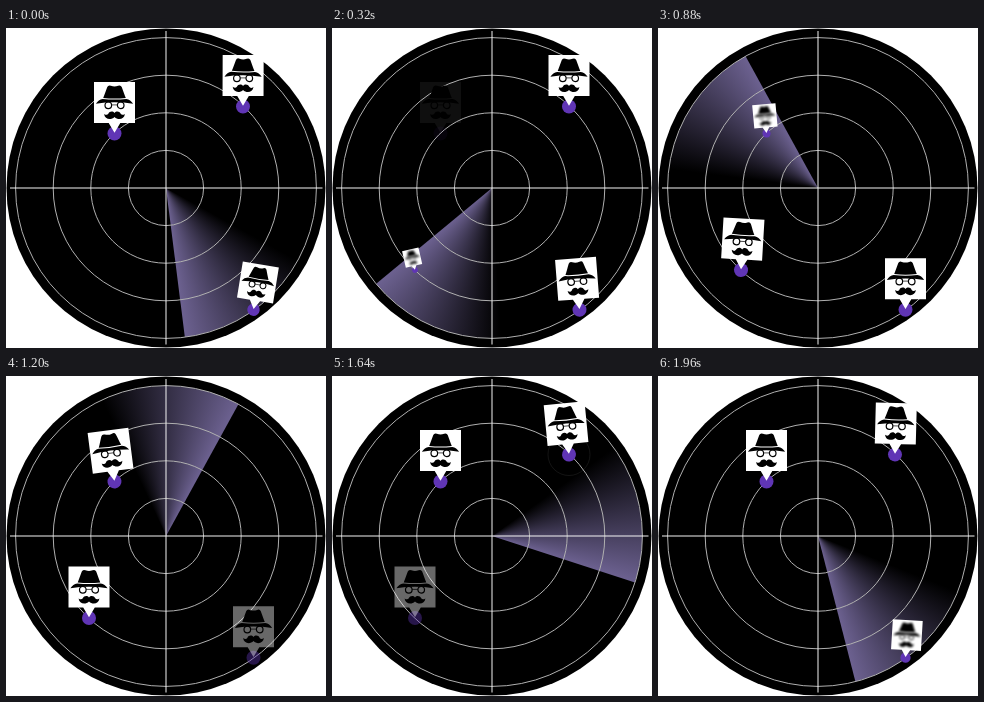
These frames come from a looping animation (320 by 320 pixels, 2 s). An HTML page with a canvas:

```html
<!DOCTYPE html>
<html lang="en">
<head>
<meta charset="utf-8">
<title>Radar</title>
<style>
  html, body { margin: 0; width: 100%; height: 100%; overflow: hidden; background: #fff; }
  canvas { display: block; }
</style>
</head>
<body>
<canvas id="stage" width="320" height="320"></canvas>
<script>
const ctx = document.getElementById('stage').getContext('2d');
const LOOP = 2000, STEP = 40, C = 160, TAU = Math.PI * 2;
const rad = deg => deg * Math.PI / 180;

// x, y of the dot and the moment the sweep reaches it
const pins = [
  [83, 242, 280],
  [108.5, 105.5, 800],
  [237, 78.5, 1280],
  [247.5, 281.7, 1840]
];

// Decaying swing: time in ms, tilt in degrees
const swing = [[0, -16], [180, 10], [410, -7.4], [610, 3.4], [740, 0]];

const crown = new Path2D('M-11.3-35.6C-9.8-39-8.6-43-7.2-46.6Q-6.2-48.8-3.6-47.8Q0-46.4 3.6-47.8Q6.2-48.8 7.2-46.6C8.6-43 9.8-39 11.3-35.6Q0-34.4-11.3-35.6Z');
const brim = new Path2D('M-18.6-29.8Q-16-33.8-11.8-34.6Q0-33.4 11.8-34.6Q16-33.8 18.6-29.8Q9-31.2 0-31.2T-18.6-29.8Z');
const moustache = new Path2D('M0-20.6C1.8-23 5-22.4 6.2-19.8Q7.6-17.6 10.4-19.6C9.8-14.2 3.6-13 0-16.6C-3.6-13-9.8-14.2-10.4-19.6Q-7.6-17.6-6.2-19.8C-5-22.4-1.8-23 0-20.6Z');

function tilt(age) {
  const i = swing.findIndex(k => k[0] > age);
  if (i < 0) return 0;
  const [t0, a] = swing[i - 1], [t1, b] = swing[i];
  return a + (b - a) * (1 - Math.cos(Math.PI * (age - t0) / (t1 - t0))) / 2;
}

function circle(x, y, r) {
  ctx.beginPath();
  ctx.arc(x, y, r, 0, TAU);
}

function line(x1, y1, x2, y2) {
  ctx.beginPath();
  ctx.moveTo(x1, y1);
  ctx.lineTo(x2, y2);
  ctx.stroke();
}

function drawSweep(t) {
  const lead = rad(82.8 + 360 * t / LOOP), tail = rad(54);
  const fade = ctx.createConicGradient(lead - tail, C, C);
  fade.addColorStop(0, 'rgba(108,97,144,0)');
  fade.addColorStop(tail / TAU, 'rgb(108,97,144)');
  fade.addColorStop(0.5, 'rgb(108,97,144)');
  fade.addColorStop(0.5, 'rgba(108,97,144,0)');
  ctx.fillStyle = fade;
  ctx.beginPath();
  ctx.moveTo(C, C);
  ctx.arc(C, C, 150.3, lead - tail, lead);
  ctx.fill();
}

function drawGrid() {
  ctx.lineWidth = 1;
  ctx.strokeStyle = '#b0b0b0';
  for (let i = 1; i <= 4; i++) {
    circle(C, C, 37.6 * i);
    ctx.stroke();
  }
  ctx.strokeStyle = '#f4f4f4';
  line(4, C, 316.5, C);
  line(C, 3, C, 316.5);
}

function drawFace() {
  ctx.fillStyle = ctx.strokeStyle = '#000';
  [crown, brim, moustache].forEach(p => ctx.fill(p));
  ctx.lineWidth = 1.2;
  for (const x of [-6.2, 6.2]) {
    circle(x, -28.2, 3.3);
    ctx.stroke();
  }
  ctx.lineWidth = 0.7;
  line(-2.9, -28.6, 2.9, -28.6);
}

function drawPin(x, y, age) {
  if (age >= 1600) return;
  ctx.save();
  ctx.translate(x, y);

  const wave = (age - 200) / 200;
  if (wave > 0 && wave < 1) {
    ctx.strokeStyle = `rgba(255,255,255,${0.4 * (1 - wave)})`;
    ctx.lineWidth = 1;
    circle(0, 0, 7 + 17.5 * wave);
    ctx.stroke();
  }

  const size = Math.min(1, 0.25 + 0.004 * age);
  ctx.rotate(rad(tilt(age)));
  ctx.scale(size, size);
  ctx.globalAlpha = (1 - Math.max(0, age - 1200) / 400) ** 1.75;

  ctx.fillStyle = '#6035b5';
  circle(0, 0, 7);
  ctx.fill();
  ctx.fillStyle = '#fff';
  ctx.beginPath();
  ctx.moveTo(-20.5, -51.5);
  ctx.lineTo(20.5, -51.5);
  ctx.lineTo(20.5, -10.5);
  ctx.lineTo(5.8, -10.5);
  ctx.lineTo(0, -0.8);
  ctx.lineTo(-5.8, -10.5);
  ctx.lineTo(-20.5, -10.5);
  ctx.fill();

  // The face stays black on the black disc while its card fades
  ctx.globalAlpha = 1;
  if (age < 140) ctx.filter = 'blur(1px)';
  drawFace();
  ctx.restore();
}

function draw(now) {
  const t = Math.floor(now % LOOP / STEP) * STEP;
  ctx.clearRect(0, 0, 320, 320);
  ctx.fillStyle = '#000';
  circle(C, C, 159.5);
  ctx.fill();
  drawSweep(t);
  drawGrid();
  for (const [x, y, start] of pins) drawPin(x, y, (t - start + LOOP) % LOOP);
}

const begin = performance.now();
function loop() {
  draw(performance.now() - begin);
  requestAnimationFrame(loop);
}
loop();
</script>
</body>
</html>
```
